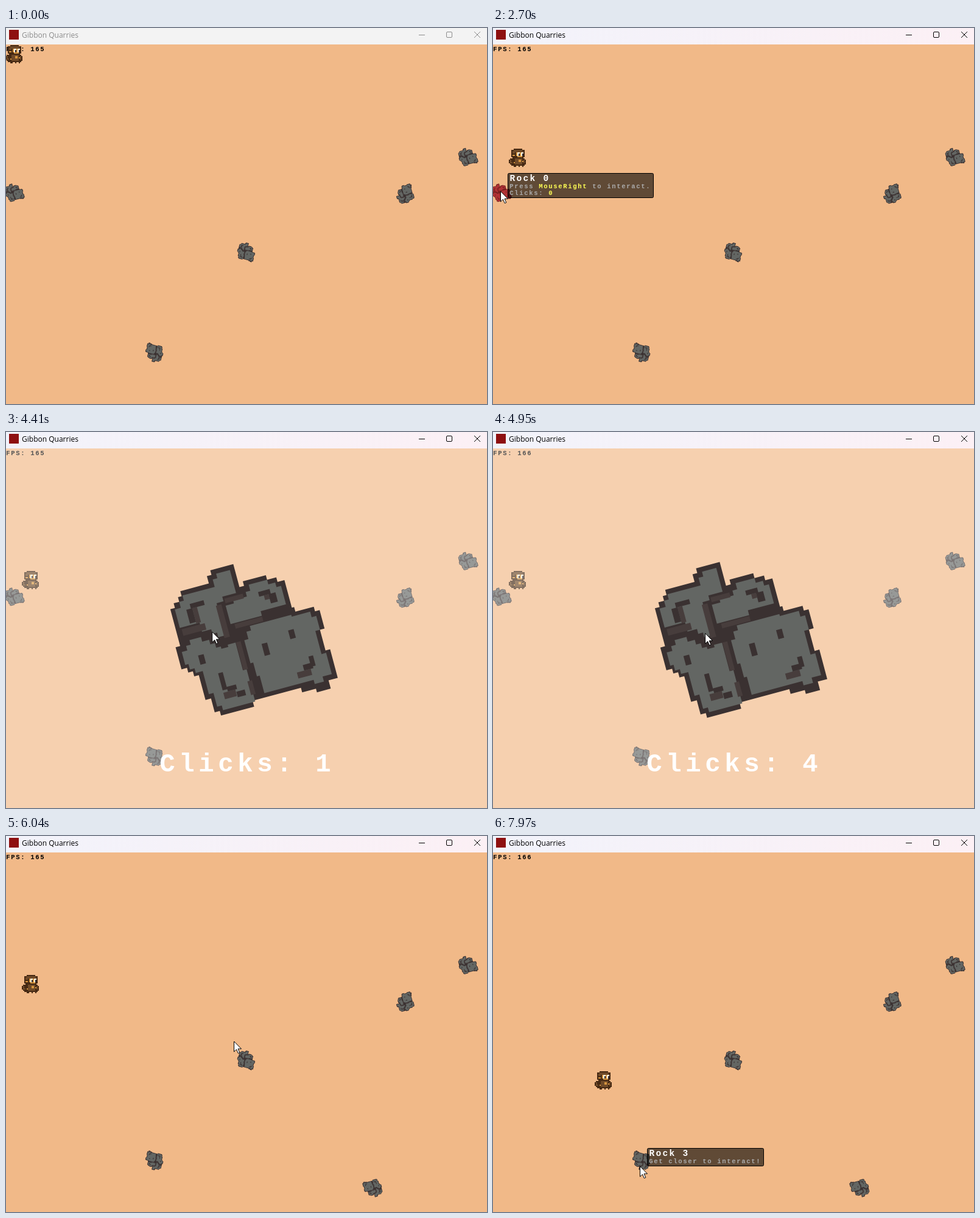
An HTML page with a canvas for the animation above (8000 ms loop, 790 by 617 pixels).

```html
<!DOCTYPE html>
<html lang="en">
<head>
<meta charset="utf-8">
<title>Gibbon Quarries</title>
<style>
html, body { margin: 0; width: 100%; height: 100%; overflow: hidden; background: #f1b988; }
canvas { display: block; }
</style>
</head>
<body>
<canvas id="stage" width="790" height="617"></canvas>
<script>
const ctx = document.getElementById('stage').getContext('2d');
const LOOP = 8000, OPEN = 3870, CLOSE = 5970;

// Key poses: time, x, y
const monkeyKeys = [[650, -1, 28], [1730, 37, 163], [2250, 26, 228], [2560, 26, 228],
  [3000, 26, 134], [3500, 26, 228], [6800, 26, 228], [7970, 167, 386]];
const cursorKeys = [[70, 330, 558], [350, 250, 420], [550, 180, 300], [820, 12.5, 268],
  [OPEN, 12.5, 268], [4140, 338.5, 328], [4750, 339, 328], [5430, 371.5, 336],
  [CLOSE, 374.5, 337], [6430, 374.5, 337], [6560, 390, 366], [6800, 392, 368],
  [7100, 250, 555], [7250, 241.5, 542]];
const clicks = [4230, 4530, 4740, 4860, 4980, 5100, 5210, 5320, 5555];
const fastSpans = [[300, 600], [1500, 2000], [3400, 3600], [4210, 4340],
  [4800, 5000], [6500, 6800], [7270, LOOP]];

const rocks = [
  { id: 0, x: 14, y: 270, turn: -15, to: CLOSE },
  { id: 1, x: 759, y: 211.5, turn: -15 },
  { id: 2, x: 395, y: 368, turn: 15 },
  { id: 3, x: 243, y: 532.5, turn: 195 },
  { id: 4, x: 655.5, y: 272, turn: -105 },
  { id: 5, x: 602, y: 578, turn: 165, from: CLOSE },
];

const rockShape = {
  body: new Path2D('M-5-16H0V-11H1V-12H6V-11H8V-10H9.5V-4H10V-3H14V-2H15V2H14V6.5H15V12.7H13V14.5' +
    'H10V13.7H7V12.7H-3.5V14H-10.7V13H-11.8V10H-13V4.6H-14V3.5H-15V2.5H-16.2V-2.3H-15.2V-10.3' +
    'H-14.2V-11.3H-13V-12.3H-12.2V-13.4H-6V-15H-5Z'),
  lobes: new Path2D('M-4-15H-1V-10H-4V-9H-5.5V-2H-7V-3H-8V-4H-10V-6H-14.3V-10H-13V-11.3H-12V-12.4H-5V-14H-4Z' +
    'M2-11H6V-10H7.5V-9H8.5V-5H3V-4H-3.8V-8H-2V-8.7H1V-9.7H2Z' +
    'M-1-1.6H0V-2.6H9V-2.2H13V-1H14V2H13V7H14V11.6H12V12.7H10V11.8H-.7V8H-1.3V5H-1.9V0H-1Z' +
    'M-13-3H-10.5V-2H-9V-1H-8V0H-7V.5H-5.5V0H-3.8V6H-3V13H-10V12H-11V9H-12V4H-13.5V3H-14.5V1.8H-15.2V-1H-14V-2H-13Z'),
  shade: new Path2D('M-5.8-8.5h1.2v7h-1.2zM-14-5.6h5v1.4h-5zM-10.7-9.3h1v3.3h-1zM-3.7-9.5h4v1h-4z' +
    'M-3-3.8h6v1h-6zM-3.7 0h1v6h-1zM7 9.4h3v1.3h-3zM-9 9.5h2.6v1.4h-2.6zM-3.5 8.5h1v3h-1zM4.5-8h1v1h-1z'),
  marks: new Path2D('M-11-10.3h3v1h-3zM-12-9.3h1.3v3h-1.3zM3.5-9h2.5v1h-2.5zM5.5-8h1.5v2h-1.5z' +
    'M7.5.4h1.2v1.9h-1.2zM1.4 1.7h1.2v2.6h-1.2zM10.2 6.8h1v2.2h-1zM8.6 8.2h2v1.2h-2z' +
    'M-12.1.6h1.2v2h-1.2zM-9 5.3h1v3.7h-1zM-8 8.5h2v1h-2zM-6.3 10h1.8v1.2h-1.8z'),
};
const stone = ['#3a3131', '#636663', '#473d3c'];
const redStone = ['#74201f', '#b23236', '#8c2528'];

const monkeyParts = [
  ['#462913', 'M4 0H11V1H13V7H12V8H13V9H14V13H13V14H12V15H11V14H9V15H8V14H6V15H4V14H2V13H1V12H0V9H1V8H3V7H2V1H4Z'],
  ['#704a28', 'M4 1H11V2H12V3H3V2H4ZM3 3H5V4H3ZM5 8H11V13H5ZM1 9H2V11H3V12H1ZM12 9H13V12H12Z'],
  ['#d6953f', 'M6 3H12V6H11V7H7V6H6ZM3 5H5V6H3ZM8 9H10V11H8ZM4 11H5V12H4ZM11 10H12V11H11Z'],
  ['#fff3dc', 'M7 3H9V6H7ZM10 3H12V6H10Z'],
  ['#2c2630', 'M8 4H9V6H8ZM11 4H12V6H11Z'],
].map(([color, d]) => [color, new Path2D(d)]);

const arrow = new Path2D('M0 0V17L4 13.2L6.8 19.6L9.3 18.5L6.6 12.2H12Z');

function pose(keys, t) {
  const i = keys.findIndex(k => k[0] > t);
  if (i === 0) return keys[0].slice(1);
  if (i < 0) return keys[keys.length - 1].slice(1);
  const [t0, x0, y0] = keys[i - 1], [t1, x1, y1] = keys[i];
  const k = (t - t0) / (t1 - t0);
  return [x0 + (x1 - x0) * k, y0 + (y1 - y0) * k];
}

function at(x, y, scale, degrees, draw) {
  ctx.save();
  ctx.translate(x, y);
  ctx.scale(scale, scale);
  ctx.rotate(degrees * Math.PI / 180);
  draw();
  ctx.restore();
}

function fill(color, path) {
  ctx.fillStyle = color;
  ctx.fill(path);
}

// Wide game lettering: each character takes one em
function label(str, x, y, em, color) {
  ctx.font = `bold ${em * 1.32}px "Liberation Mono", monospace`;
  ctx.letterSpacing = em * 0.208 + 'px';
  ctx.fillStyle = color;
  ctx.fillText(str, x + em * 0.04, y);
}

function drawRock(x, y, scale, turn, [dark, light, mid]) {
  at(x, y, scale, turn, () => {
    fill(dark, rockShape.body);
    fill(light, rockShape.lobes);
    fill(mid, rockShape.shade);
    fill(dark, rockShape.marks);
  });
}

function drawTooltip(rock, near, cx, cy) {
  const x = Math.floor(cx) + 12, y = Math.floor(cy) - 30;
  ctx.beginPath();
  ctx.roundRect(x + 0.5, y + 0.5, near ? 239 : 191, near ? 40 : 29, 2);
  ctx.fillStyle = 'rgba(0,0,0,.6)';
  ctx.fill();
  ctx.strokeStyle = '#000';
  ctx.lineWidth = 1;
  ctx.stroke();
  const line = (str, col, row, color) => label(str, x + 3 + col * 8, y + 25 + row * 11, 8, color);
  label('Rock ' + rock.id, x + 3, y + 13, 11, '#fff');
  if (!near) return line('Get closer to interact!', 0, 0, '#aaa');
  line('Press', 0, 0, '#aaa');
  line('MouseRight', 6, 0, '#ffff55');
  line('to interact.', 17, 0, '#aaa');
  line('Clicks:', 0, 1, '#aaa');
  line('0', 8, 1, '#ffff55');
}

function drawTitleBar(active) {
  const g = ctx.createLinearGradient(0, 0, 790, 0);
  g.addColorStop(0, active ? '#f2f3fb' : '#f3f3f3');
  g.addColorStop(1, active ? '#fcf0f5' : '#f3f3f3');
  ctx.fillStyle = g;
  ctx.fillRect(0, 0, 790, 27);
  ctx.fillStyle = '#8e1010';
  ctx.fillRect(5, 3, 16, 16);
  const ink = active ? '#000' : '#8c8c8c';
  ctx.font = '12px "Open Sans", sans-serif';
  ctx.letterSpacing = '0px';
  ctx.fillStyle = ink;
  ctx.fillText('Gibbon Quarries', 26, 16);
  ctx.strokeStyle = ink;
  ctx.lineWidth = 1;
  ctx.beginPath();
  ctx.moveTo(678, 11.5);
  ctx.lineTo(688, 11.5);
  ctx.roundRect(723.5, 6.5, 9, 9, 1.5);
  ctx.moveTo(769, 6);
  ctx.lineTo(779, 16);
  ctx.moveTo(779, 6);
  ctx.lineTo(769, 16);
  ctx.stroke();
}

function drawMinigame(t) {
  ctx.fillStyle = 'rgba(255,255,255,.33)';
  ctx.fillRect(0, 27, 790, 590);
  const done = clicks.filter(c => c <= t);
  const since = done.length ? t - done[done.length - 1] : Infinity;
  const pulse = 1 + 0.17 * Math.max(0, 1 - since / 110);
  drawRock(405.7, 337.8, 7.83 * pulse, -15, stone);
  label('Clicks: ' + done.length, 251, 557, 32, '#fff');
}

function frame(now) {
  const t = now % LOOP;
  const [mx, my] = pose(monkeyKeys, t).map(Math.round);
  const [cx, cy] = pose(cursorKeys, t);
  const playing = t >= OPEN && t < CLOSE;
  const shown = rocks.filter(r => t >= (r.from || 0) && t < (r.to || LOOP));
  const hovered = !playing && t >= 70 && shown.find(r => Math.hypot(r.x - cx, r.y - cy) < 17);
  const near = hovered && Math.hypot(hovered.x - mx - 14, hovered.y - my - 15) < 64;

  ctx.fillStyle = '#f1b988';
  ctx.fillRect(0, 0, 790, 617);
  for (const r of shown) drawRock(r.x, r.y, 0.95, r.turn, near && r === hovered ? redStone : stone);
  const fast = fastSpans.some(([a, b]) => t >= a && t < b);
  label('FPS: ' + (fast ? 166 : 165), 0, 38, 8, '#000');
  at(mx, my, 2, 0, () => monkeyParts.forEach(([color, path]) => fill(color, path)));
  if (playing) drawMinigame(t);
  if (hovered) drawTooltip(hovered, near, cx, cy);
  drawTitleBar(t >= 600);
  if (t >= 70) at(cx, cy, 1, 0, () => {
    fill('#fff', arrow);
    ctx.strokeStyle = '#000';
    ctx.lineWidth = 1;
    ctx.stroke(arrow);
  });
  requestAnimationFrame(frame);
}
requestAnimationFrame(frame);
</script>
</body>
</html>
```
